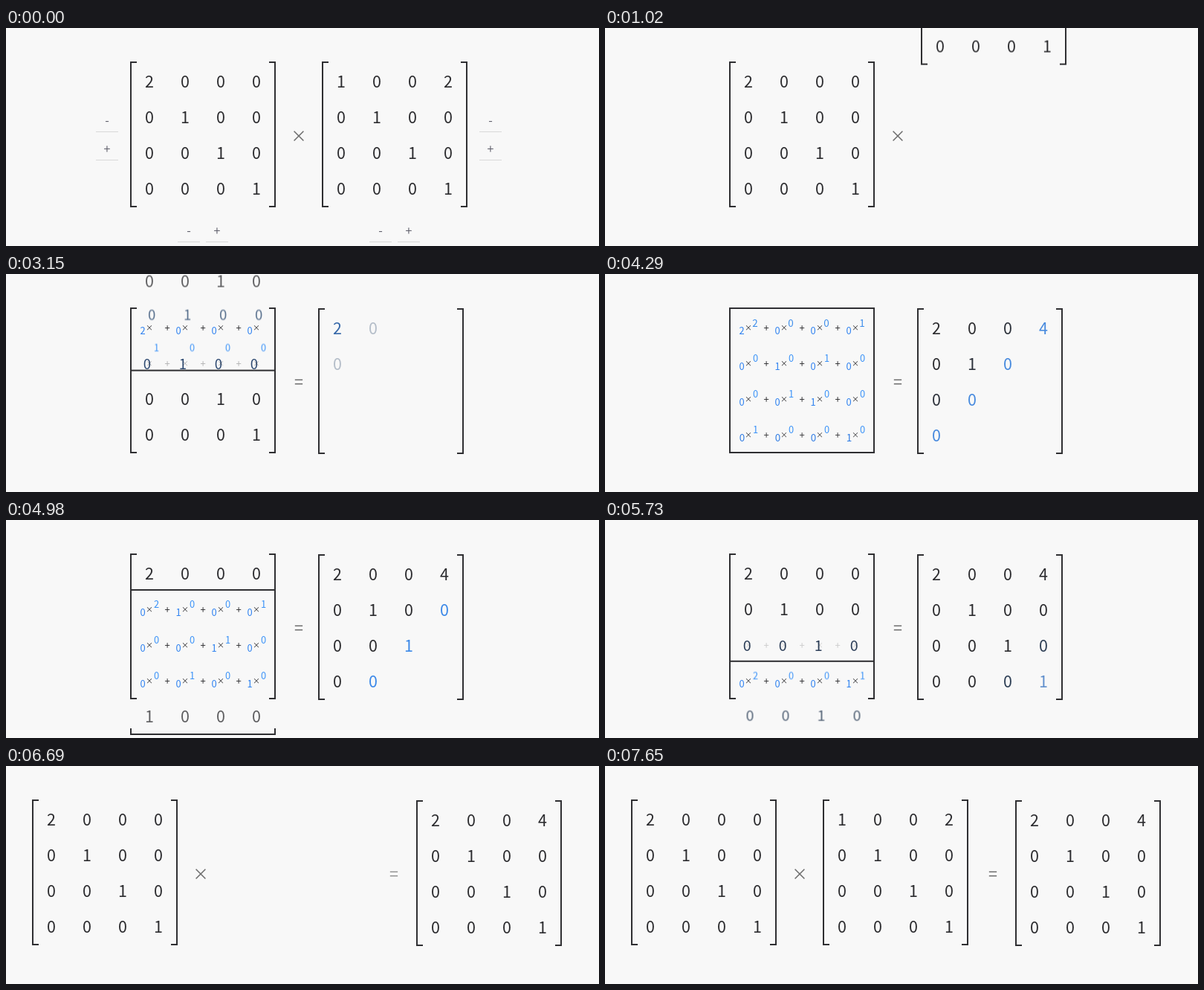
Animation of 798 by 293 pixels, one loop 8.07 s. Source, as an HTML page:

```html
<!DOCTYPE html>
<html lang="en">
<head>
<meta charset="utf-8">
<title>Matrix multiplication</title>
<style>
  html, body { margin: 0; width: 100%; height: 100%; overflow: hidden; background: #f8f8f8; }
  svg { display: block; width: 798px; height: 293px; }
  text {
    font: 21.5px "Noto Sans CJK JP", "Noto Sans CJK SC", "Noto Sans CJK", "Open Sans", sans-serif;
    text-anchor: middle;
    fill: #2b2b2e;
  }
  .bracket { fill: none; stroke: #2f2f32; stroke-width: 2; }
  .sign { fill: #6c6c6c; }
  .button text { font-size: 16px; fill: #62626e; }
  .button rect { fill: #d9d9d9; }
  .times { font-size: 10px; }
  .plus { font-size: 13px; }
</style>
</head>
<body>
<svg id="stage" viewBox="0 0 798 293"></svg>
<script>
const LOOP = 8070;
const CELL = 48;
const INK = '#2b2b2e';
const BLUE = '#2d80f0';
const SKY = '#3a92f8';
const A = [[2, 0, 0, 0], [0, 1, 0, 0], [0, 0, 1, 0], [0, 0, 0, 1]];
const B = [[1, 0, 0, 2], [0, 1, 0, 0], [0, 0, 1, 0], [0, 0, 0, 1]];
const C = A.map(row => B[0].map((_, c) => row.reduce((sum, v, k) => sum + v * B[k][c], 0)));
// columns of B laid as rows, the first column lowest
const TURNED = [3, 2, 1, 0].map(c => B.map(row => row[c]));

const stage = document.getElementById('stage');
const stepTime = s => 2585 + 500 * (s - 1);
const place = (x, y, scale = 1, turn = 0) =>
  `translate(${x}px, ${y}px) rotate(${turn}deg) scale(${scale})`;
const cellPos = i => 26 + CELL * i;
const rowPos = i => 27 + CELL * i;

function add(parent, tag, attrs = {}, text) {
  const el = document.createElementNS('http://www.w3.org/2000/svg', tag);
  for (const name in attrs) el.setAttribute(name, attrs[name]);
  if (text !== undefined) el.textContent = text;
  parent.append(el);
  return el;
}

function group(parent, x = 0, y = 0, turn = 0) {
  const g = add(parent, 'g');
  g.style.transform = place(x, y, 1, turn);
  return g;
}

function glyph(parent, text, x, y, cls = '', drop = 8) {
  const el = add(parent, 'text', { y: drop, class: cls }, text);
  el.style.transform = place(x, y);
  return el;
}

// each move is [start ms, length ms, properties, easing]
function tween(el, start, ...moves) {
  let now = start;
  const frames = [{ offset: 0, ...now }];
  for (const [from, length, props, easing = 'ease'] of moves) {
    frames.push({ offset: from / LOOP, ...now, easing });
    now = { ...now, ...props };
    frames.push({ offset: (from + length) / LOOP, ...now });
  }
  frames.push({ offset: 1, ...now });
  el.animate(frames, { duration: LOOP, iterations: Infinity });
}

function brackets(parent) {
  return add(parent, 'path', { class: 'bracket', d: 'M9 1H1V195H9M187 1H195V195H187' });
}

function eachCell(data, visit) {
  data.forEach((row, r) => row.forEach((v, c) => visit(v, r, c)));
}

function button(parent, label, x, y) {
  const g = add(parent, 'g', { class: 'button' });
  add(g, 'rect', { x, y, width: 30, height: 1 });
  add(g, 'text', { x: x + 15, y: y - 9 }, label);
}

function buildButtons() {
  const g = group(stage);
  for (const x of [121, 637]) {
    button(g, '-', x, 139);
    button(g, '+', x, 177);
  }
  for (const x of [231, 489]) {
    button(g, '-', x, 287);
    button(g, '+', x + 38, 287);
  }
  tween(g, { opacity: 1 }, [500, 300, { opacity: 0 }]);

  const hover = add(stage, 'rect', {
    x: 523.5, y: 191.5, width: 47, height: 47, fill: 'none', stroke: '#e4e4e4'
  });
  tween(hover, { opacity: 0 }, [140, 80, { opacity: 1 }], [500, 200, { opacity: 0 }]);
}

// B rises, then turns on its way to the left
function buildFlight() {
  const g = group(stage);
  brackets(group(g, -98, -98));
  eachCell(B, (v, r, c) => {
    const x = cellPos(c) - 98, y = rowPos(r) - 98;
    tween(glyph(g, v, x, y), { transform: place(x, y), opacity: 1 },
      [1250, 705, { transform: place(x, y, 1, 90), opacity: 0.75 }]);
  });
  tween(g, { transform: place(523, 143), opacity: 1 },
    [500, 750, { transform: place(523, -61) }],
    [1250, 705, { transform: place(265, -61, 1, -90) }],
    [1970, 0, { opacity: 0 }]);
}

function buildLeft() {
  const g = group(stage);
  tween(g, { transform: place(167, 45) }, [stepTime(8), 500, { transform: place(35, 45) }]);
  brackets(g);

  eachCell(A, (v, r, c) => {
    const x = cellPos(c), y = rowPos(r);
    const on = stepTime(r + 1), off = stepTime(r + 5);
    const big = { transform: place(x, y), fill: INK };
    const small = { transform: place(x - 9, y + 4, 0.6), fill: BLUE };
    tween(glyph(g, v, x, y), big, [on, 300, small], [off, 300, big]);

    const marks = [glyph(g, '×', x, y, 'times', 4)];
    if (c < 3) marks.push(glyph(g, '+', x + 24, y, 'plus', 4.5));
    for (const mark of marks) {
      tween(mark, { opacity: 0 }, [on, 300, { opacity: 1 }], [off, 300, { opacity: 0 }]);
    }
  });

  buildSlider(g);

  const times = glyph(g, '×', 227, 100, 'sign');
  tween(times, { opacity: 1 }, [1300, 250, { opacity: 0 }], [stepTime(8), 250, { opacity: 1 }]);
}

// turned B drops through A one row at a time
function buildSlider(parent) {
  const g = group(parent);
  brackets(group(g, 0, 196, -90));

  TURNED.forEach((row, j) => row.forEach((v, c) => {
    const x = cellPos(c), y = rowPos(j);
    const big = { transform: place(x, y), fill: INK, opacity: 0.75 };
    const small = { transform: place(x + 9.5, y - 6.5, 0.6), fill: SKY, opacity: 1 };
    tween(glyph(g, v, x, y), big, [stepTime(4 - j), 300, small], [stepTime(8 - j), 300, big]);
  }));

  const drops = [];
  for (let s = 1; s <= 7; s++) {
    drops.push([stepTime(s), 160, { transform: place(0, (s - 4) * CELL) }]);
  }
  tween(g, { transform: place(0, -204), opacity: 0 },
    [1970, 0, { opacity: 1 }], ...drops,
    [stepTime(8), 220, { transform: place(0, 224), opacity: 0 }]);
}

function buildResult() {
  const g = group(stage);
  tween(g, { transform: place(420, 46) }, [stepTime(8), 500, { transform: place(552, 46) }]);
  tween(brackets(g), { opacity: 0 }, [2265, 300, { opacity: 1 }]);

  eachCell(C, (v, r, c) => {
    const t = stepTime(r + c + 1);
    tween(glyph(g, v, cellPos(c), rowPos(r)), { opacity: 0, fill: INK },
      [t, 300, { opacity: 1, fill: '#3b88e8' }],
      [t + 500, 300, { fill: INK }]);
  });

  tween(glyph(stage, '=', 394, 145, 'sign'), { opacity: 0 },
    [1400, 300, { opacity: 1 }], [stepTime(8), 200, { opacity: 0 }]);
  tween(glyph(stage, '=', 522, 145, 'sign'), { opacity: 0 },
    [6400, 290, { opacity: 0.72 }], [6780, 300, { opacity: 1 }]);
}

function buildReturn() {
  const g = group(stage, 293, 45);
  brackets(g);
  eachCell(B, (v, r, c) => glyph(g, v, cellPos(c), rowPos(r)));
  tween(g, { opacity: 0 }, [6775, 875, { opacity: 1 }]);
}

buildButtons();
buildLeft();
buildFlight();
buildResult();
buildReturn();
</script>
</body>
</html>
```
